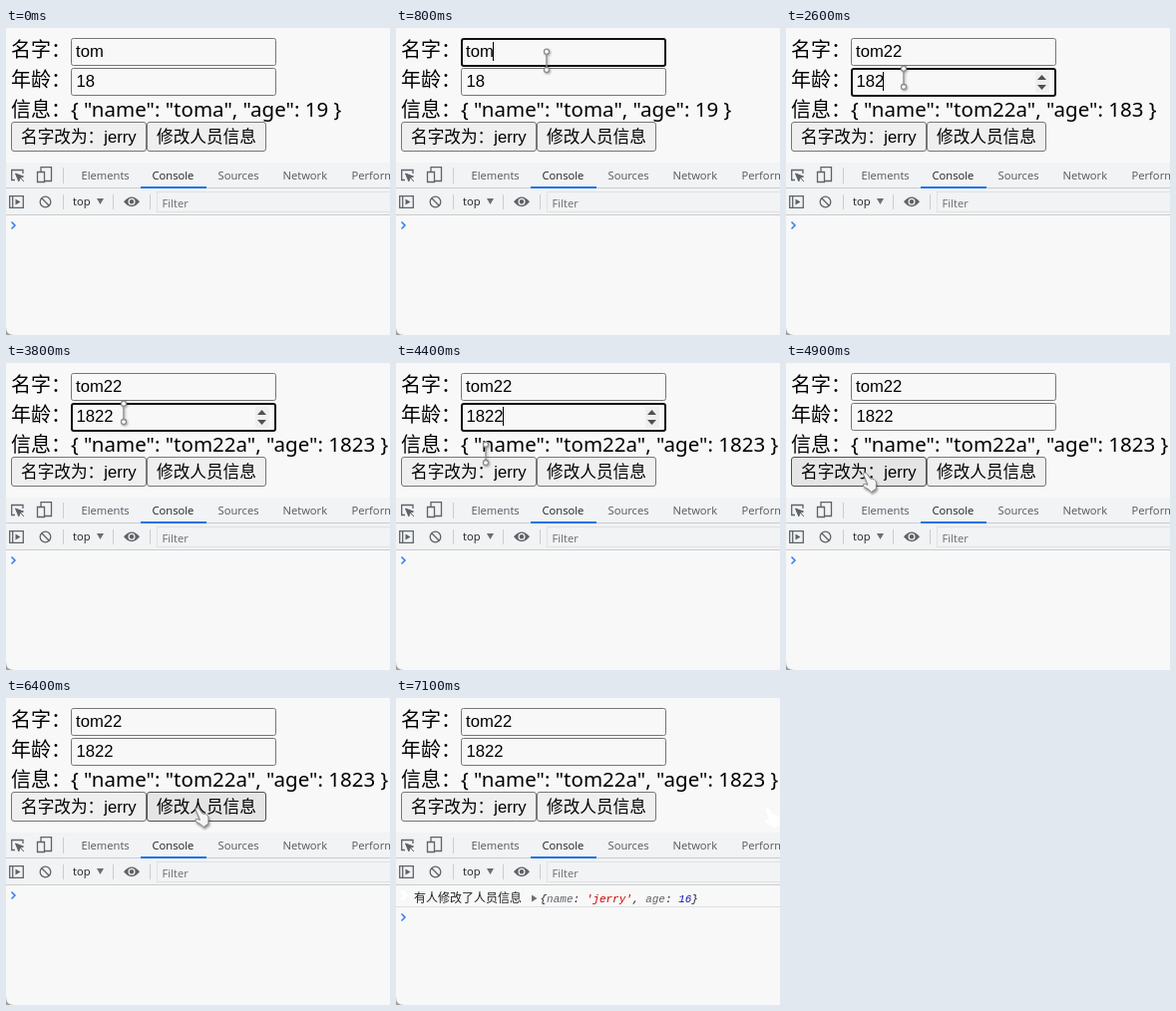
Animation of 385x308 px, one loop 7.9 s. Source, as an HTML page:

```html
<!DOCTYPE html>
<html lang="zh-CN">
<head>
<meta charset="utf-8">
<title>Form watcher</title>
<style>
  html, body { margin: 0; width: 100%; height: 100%; overflow: hidden; background: #f8f8f8; }
  svg { display: block; width: 385px; height: 308px; }
  .label { font: 350 20px "Noto Sans CJK SC", sans-serif; }
  .info { font: 20.5px "Noto Sans", "Open Sans", sans-serif; }
  .ctl { font: 350 16.667px "Liberation Sans", "Noto Sans CJK SC", sans-serif; }
  .ui { font: 11.2px "Open Sans", "Noto Sans", sans-serif; fill: #54585d; }
  .ui .on { fill: #202124; }
  .ui .hint { fill: #6c6c6c; }
  .log { font: 350 12px "Noto Sans CJK SC", sans-serif; fill: #222; }
  .mono { font: italic 11px "Liberation Mono", monospace; fill: #222; }
  .box { fill: #f8f8f8; stroke: #767676; }
  .box.hover { stroke: #4f4f4f; }
  .box.focus { stroke: #101010; stroke-width: 2; }
  .btn { fill: #efefef; stroke: #767676; }
  .btn.hover { fill: #e5e5e5; stroke: #4f4f4f; }
  .btn.active { fill: #f5f5f5; stroke: #8d8d8d; }
  .icon { fill: none; stroke: #5f6368; stroke-width: 1.3; }
  .rule { stroke: #cacdd1; }
  .prompt { fill: none; stroke: #367cf1; stroke-width: 1.5; }
  .hand { fill: #f4f4f4; stroke: #858585; stroke-width: 1; filter: drop-shadow(1px 2px 1px #0006); }
  .hand.plain { fill: #fff; stroke: #fff; filter: none; }
  .beam { fill: #fff; stroke: #8c8c8c; stroke-width: 1.3; filter: drop-shadow(1px 1px 1px #0005); }
</style>
</head>
<body>
<svg viewBox="0 0 385 308">
  <rect width="385" height="308" fill="#f8f8f8"/>

  <g class="label">
    <text x="5" y="29">名字：</text>
    <text x="5" y="59">年龄：</text>
    <text x="5" y="89">信息：</text>
  </g>
  <text id="info" class="info" x="65" y="89"></text>

  <rect id="nameBox" class="box" rx="2"/>
  <rect id="ageBox" class="box" rx="2"/>
  <g id="spin">
    <rect x="250" y="44" width="14" height="21" fill="#efefef"/>
    <path d="M252 52l4.5-5 4.5 5zM252 57l4.5 5 4.5-5z" fill="#505050"/>
  </g>
  <g class="ctl">
    <text id="name" x="70" y="29"></text>
    <text id="age" x="70.5" y="59"></text>
  </g>
  <rect id="caret" width="1" height="19"/>

  <rect id="btn1" class="btn" x="5.5" y="94.5" width="135" height="29" rx="2.5"/>
  <rect id="btn2" class="btn" x="141.5" y="94.5" width="119" height="29" rx="2.5"/>
  <g class="ctl">
    <text x="15" y="115">名字改为：jerry</text>
    <text x="151" y="115">修改人员信息</text>
  </g>

  <!-- developer panel -->
  <rect y="135" width="385" height="52" fill="#f1f3f4"/>
  <path class="rule" d="M0 160.5H385M0 187.5H385M57.5 140V156M57.5 167V182M107.5 167V182M144.5 167V182"/>
  <g class="ui">
    <text x="75.5" y="152">Elements</text>
    <text class="on" x="146.5" y="152">Console</text>
    <text x="212.5" y="152">Sources</text>
    <text x="277.5" y="152">Network</text>
    <text x="346.5" y="152">Performance</text>
    <text class="on" x="67" y="178">top</text>
    <text class="hint" x="156.5" y="179.5">Filter</text>
  </g>
  <rect x="135" y="159" width="66" height="2" fill="#1a73e8"/>
  <path d="M91 171h7l-3.5 6z" fill="#6e6e6e"/>
  <rect x="151.5" y="164.5" width="240" height="20" fill="none" stroke="#dfe1e5"/>
  <g class="icon">
    <path d="M9 152.5H5.7V142.5H17V146"/>
    <path d="M9.5 146l8 3-3.4 1.3-1.3 3.6zM14 150l4 4" fill="#5f6368" stroke-width="1"/>
    <path d="M35 144V139.700H45.500V153.500H39M31.500 144.500H38.500V154.500H31.500Z"/>
    <path d="M3.7 168.7H17.3V180.3H3.7ZM6.7 168.7V180.3"/>
    <path d="M9.5 171.5l5 3-5 3z" fill="#5f6368" stroke="none"/>
    <circle cx="39.5" cy="174.5" r="5.3"/>
    <path d="M35.8 170.8l7.4 7.4"/>
    <path d="M118 174.3Q126 164.5 134 174.3Q126 184 118 174.3Z" fill="#5f6368" stroke="none"/>
    <circle cx="126" cy="174.3" r="2.9" fill="#5f6368" stroke="#f1f3f4"/>
  </g>

  <g id="entry">
    <path d="M4 193h4l4 5-4 5H4l3-5z" fill="#fff"/>
    <path class="rule" d="M0 209.5H385" stroke-opacity=".6"/>
    <text class="log" x="18" y="205">有人修改了人员信息</text>
    <path d="M136 197.5v7l5.5-3.5z" fill="#6e6e6e"/>
    <text class="mono" x="144.5" y="204.5">{<tspan fill="#5f6368">name</tspan>: <tspan fill="#c80000">'jerry'</tspan>, <tspan fill="#5f6368">age</tspan>: <tspan fill="#1a1aa6">16</tspan>}</text>
  </g>
  <path id="prompt" class="prompt" d="M5.5 194.5l3.5 3.5-3.5 3.5"/>
  <path d="M0 300Q0 308 8 308H0Z" fill="#a0a0a0"/>

  <g id="beam" class="beam">
    <path d="M0-7V6"/>
    <circle cy="-9.3" r="2.5"/>
    <circle cy="9" r="2.5"/>
  </g>
  <path id="hand" class="hand" d="M0 2.5Q.5-.2 3 1.500L7 7Q11 6.500 12.500 9.500Q13.500 12 12.800 14.500L13 17 8 20.500Q6 17.500 2 16Q-1 14.500 0 12.800Q1.500 12 4.500 13.300Z"/>
</svg>
<script>
const LOOP = 7900, STEP = 100;
const $ = id => document.getElementById(id);

// Each track lists [start time, value]; a value holds until the next entry.
const tracks = {
  name: [[0, 'tom'], [1200, 'tom2'], [1300, 'tom22']],
  age: [[0, 18], [2600, 182], [3300, 1822]],
  focus: [[0, ''], [700, 'name'], [2200, 'age'], [4800, '']],
  caret: [[0, 1], [3100, 0], [3300, 1], [3800, 0], [4300, 1]],
  hover: [[0, ''], [100, 'age'], [500, ''], [600, 'name'], [1400, ''], [1500, 'age'],
    [4200, ''], [4500, 'btn1'], [6100, ''], [6200, 'btn2'], [7000, '']],
  press: [[0, 0], [4800, 1], [4900, 0], [5100, 1], [5200, 0], [5300, 1], [5400, 0],
    [5600, 1], [5700, 0], [5800, 1], [5900, 0], [6600, 1], [6700, 0]],
  logged: [[0, 0], [6700, 1]],
  pointer: [[0, ''], [100, 'beam'], [4500, 'hand'], [7100, 'plain']]
};

// Pointer travel: start, end, from x, from y, to x, to y
const moves = [
  [100, 300, 151, 65, 151, 53],
  [500, 800, 151, 46, 151, 33],
  [1300, 1700, 151, 33, 118, 50],
  [4100, 4400, 118, 50, 90, 91],
  [4500, 4800, 85, 100, 77.5, 109],
  [6000, 6400, 77.5, 109, 190, 109],
  [6900, 7100, 190, 109, 371, 110]
];

const at = (track, t) => track.filter(e => e[0] <= t).pop()[1];
const show = (id, on) => $(id).style.display = on ? '' : 'none';

function place(t) {
  const m = moves.filter(m => m[0] <= t).pop() || moves[0];
  const p = Math.max(0, Math.min(1, (t - m[0]) / (m[1] - m[0])));
  const k = p * (2 - p);
  return `translate(${m[2] + (m[4] - m[2]) * k} ${m[3] + (m[5] - m[3]) * k})`;
}

function field(id, top, s) {
  const box = $(id + 'Box'), on = s.focus === id, d = on ? 1 : 0.5;
  const size = { x: 65 + d, y: top + d, width: 206 - 2 * d, height: 28 - 2 * d + (on ? 1 : 0) };
  for (const k in size) box.setAttribute(k, size[k]);
  box.setAttribute('class', 'box' + (on ? ' focus' : s.hover === id ? ' hover' : ''));
}

function button(id, s) {
  const on = s.hover === id;
  $(id).setAttribute('class', 'btn' + (on ? s.press ? ' active' : ' hover' : ''));
}

function draw(t) {
  const s = {};
  for (const k in tracks) s[k] = at(tracks[k], t);

  $('name').textContent = s.name;
  $('age').textContent = s.age;
  $('info').textContent = `{ "name": "${s.name}a", "age": ${s.age + 1} }`;
  field('name', 10, s);
  field('age', 40, s);
  show('spin', s.focus === 'age' || s.hover === 'age');
  button('btn1', s);
  button('btn2', s);

  show('caret', s.focus && s.caret);
  if (s.focus) {
    const em = s.focus === 'name' ? 1.667 + 0.556 * (s.name.length - 3) : 0.556 * String(s.age).length;
    $('caret').setAttribute('x', Math.floor(70 + em * 16.667));
    $('caret').setAttribute('y', s.focus === 'name' ? 14 : 44);
  }

  show('entry', s.logged);
  $('prompt').setAttribute('transform', `translate(0 ${s.logged ? 22 : 0})`);

  const beam = s.pointer === 'beam';
  show('beam', beam);
  show('hand', s.pointer && !beam);
  $('hand').setAttribute('class', 'hand ' + s.pointer);
  $(beam ? 'beam' : 'hand').setAttribute('transform', place(t));
}

const start = performance.now();
function tick() {
  const t = (performance.now() - start) % LOOP;
  draw(Math.floor(t / STEP) * STEP);
  requestAnimationFrame(tick);
}
tick();
</script>
</body>
</html>
```
